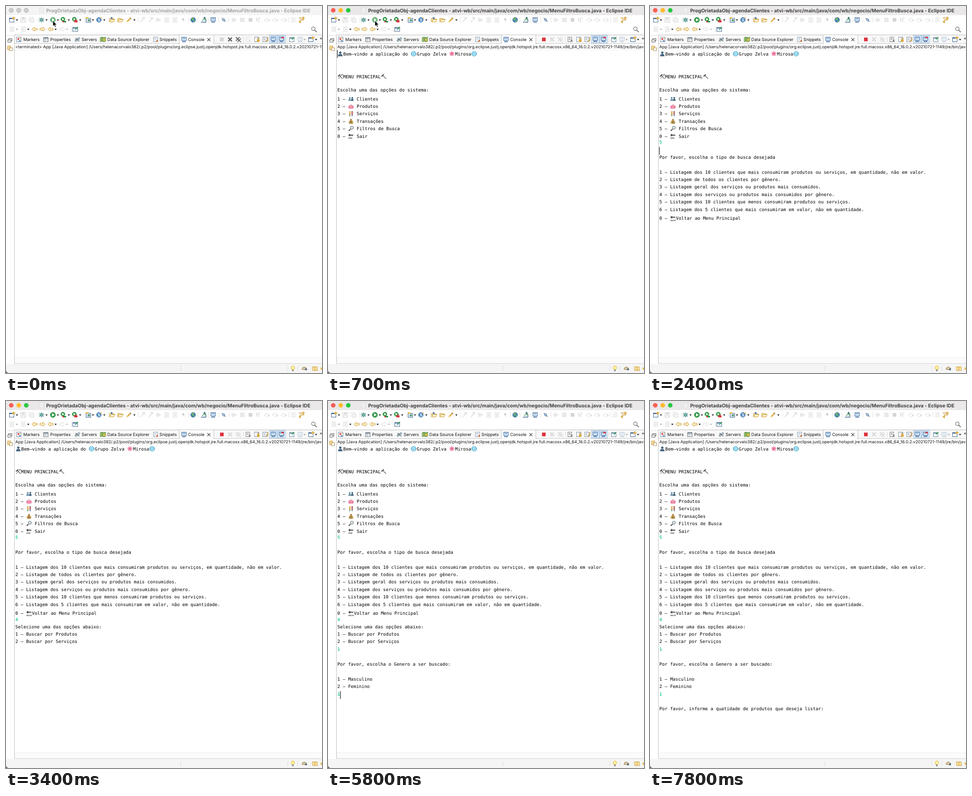
Animation, 694 px wide and 807 px high, one loop 8000 ms. Source, as an HTML page:

```html
<!DOCTYPE html>
<html lang="pt">
<head>
<meta charset="utf-8">
<title>Console</title>
<style>
  html, body { margin: 0; width: 100%; height: 100%; overflow: hidden; background: #fff; }
  svg { display: block; width: 100vw; height: 100vh; }
  text { white-space: pre; text-rendering: geometricPrecision; }
  .ui { font: 9.25px Inter, sans-serif; fill: #111; }
  .label { font: 9.15px Inter, sans-serif; fill: #111; }
  .title { font: bold 10.73px Inter, sans-serif; text-anchor: middle; }
  .mono { font: 9.84px "DejaVu Sans Mono", monospace; }
  .typed { font-weight: bold; fill: #2fcf96; }
  .tiny { font: bold 4.2px Inter, sans-serif; fill: #444; }
</style>
</head>
<body>
<svg id="stage" viewBox="0 0 694 807"></svg>
<script>
const LOOP = 8000;
const GOLD = '#c9952f', NAVY = '#3d638c', GREEN = '#35a04b', RED = '#e0303c', PALE = '#dadada', DARK = '#555';

const rect = (x, y, w, h, fill, stroke = 'none') =>
  `<rect x="${x}" y="${y}" width="${w}" height="${h}" fill="${fill}" stroke="${stroke}"/>`;
const dot = (x, y, r, fill, stroke = 'none') =>
  `<circle cx="${x}" cy="${y}" r="${r}" fill="${fill}" stroke="${stroke}"/>`;
const line = (d, stroke, w = 1) =>
  `<path d="${d}" fill="none" stroke="${stroke}" stroke-width="${w}"/>`;
const fill = (d, color, stroke = 'none') => `<path d="${d}" fill="${color}" stroke="${stroke}"/>`;
const text = (x, y, cls, s, extra = '') => `<text x="${x}" y="${y}" class="${cls}" ${extra}>${s}</text>`;
const at = (x, y, body, extra = '') => `<g transform="translate(${x} ${y})" ${extra}>${body}</g>`;
const scaled = (sx, sy, body) => `<g transform="scale(${sx} ${sy})">${body}</g>`;
const during = (from, to, body) => `<g class="timed" data-from="${from}" data-to="${to}">${body}</g>`;

const drop = (x, y, color = '#222') => fill(`M${x - 2.5} ${y - 1}h5l-2.5 3.2z`, color);
const dots = (x, y) => `<path d="M${x} ${y - 5}v11" stroke="#a5a5a5" stroke-dasharray="1 2"/>`;

// Icons are drawn around their own centre.
const icon = {
  window: (c = NAVY) => rect(-5.5, -4, 10, 9, '#fff', c) + rect(-5.5, -4, 10, 2, c),
  wizard: () => icon.window() + fill('M4 -7l1.3 2.3 2.4 .7-2.4 1.2L4 -.5 2.8-2.8.5-4l2.3-.7z', '#f3c74a', GOLD),
  save: () => rect(-5.5, -5.5, 11, 11, '#f7f7f7', PALE) + rect(-3, -5, 6, 4, PALE) + rect(-3, 1.5, 6, 4, '#fff', PALE),
  saveAll: () => rect(-5.5, -5.5, 8, 8, '#fff', PALE) + rect(-2.5, -2.5, 8, 8, '#f4f4f4', PALE),
  bug: () => line('M-5-4l10 8M5-4l-10 8M-6 0H6M0-6V6', '#4c8c8a', 1.1) + dot(0, 0, 3, '#7fc0a8', '#2d7278'),
  run: () => dot(0, 0, 5.6, GREEN, '#258239') + fill('M-2-3.5L4 0-2 3.5z', '#fff'),
  smallRun: () => at(-1, -1.5, scaled(.8, .8, icon.run())),
  cover: () => icon.smallRun() + rect(-2, 2.5, 3, 3, RED) + rect(1, 2.5, 5, 3, '#1e8d39'),
  tools: () => icon.smallRun() + rect(-1, 1, 7, 4.5, '#d8343c') + line('M1 .5v-1h3v1', '#a3202a'),
  server: () => rect(-5, -3.5, 10, 9, '#dceaf5', NAVY) + dot(1, 1, 2.5, '#59a06b') + rect(-6, -6, 6, 3, '#f0c34c'),
  service: () => dot(0, 0, 5, '#4382bd', '#285e95') + text(-2.8, 3.2, 'ui', 'S', 'style="fill:#fff;font-weight:bold"') + fill('M4-6l3 2-3 2z', '#e5ad35'),
  folder: () => fill('M-5.5 4.5v-8h4l1 1.5h5v2', '#fbe9b5', GOLD) + fill('M-5.5 4.5l3-5.5H6.5L3.5 4.5z', '#fdf1cb', GOLD),
  folderBlue: () => icon.folder() + dot(-1, -4, 2.2, '#5082b5'),
  pencil: () => line('M-4 4L4-4', '#dfac44', 3) + line('M2-5l3 3', '#9f6a38', 1.3) + fill('M-6 6l1-4 3 3z', '#f7e2a2'),
  paper: () => rect(-4, -5, 8, 10, '#fafafa', PALE) + line('M-2-2h4M-2 0h4M-2 2h4', PALE),
  brush: () => line('M-4 5L3-4M-2-5h6v4', PALE, 1.5),
  para: () => text(-2.5, 3.5, 'ui', '¶', 'style="fill:#bbb"'),
  globe: () => dot(0, 0, 5.2, '#4186bb', '#2a608d') + fill('M-4-2l3-3 3 1-1 3-3 3zM1 1l3-1-1 4-2 1z', '#78b767'),
  runner: () => line('M-6 5h11V-2', NAVY, 1.3) + line('M-3 2l4-4 4-2M0-4l5 5', '#45945b', 1.5) + dot(2, -5, 1.6, '#355f92'),
  screen: () => rect(-5, -5, 10, 7.5, '#d8eafa', '#335e92') + rect(-3, -3, 6, 1, '#335e92') + line('M-4 5H4', '#335e92', 1.6),
  skip: () => line('M-4-4L4 4', NAVY, 1.2) + dot(0, 0, 2.5, '#bed1e6', NAVY),
  play: () => rect(-5, -4, 1.5, 8, PALE) + fill('M-2-4L5 0-2 4z', '#eee', PALE),
  pause: () => rect(-4, -4, 3, 8, '#eee', PALE) + rect(1, -4, 3, 8, '#eee', PALE),
  stop: (c = '#d4d4d4') => rect(-4, -4, 8, 8, c),
  zig: () => line('M-5 4v-8l5 8v-8h4', PALE, 1.3),
  step: () => line('M-5 3q0-6 5-6t4 5M2 0l2 3 3-3M-2 4h4', PALE, 1.2),
  lines: () => line('M-5-4H5M-5 0H5M-5 4H2', PALE, 1.4) + line('M4 2v4', PALE),
  flow: () => line('M-6-4H4M-3 0H6M-6 4h5', GOLD, 1.6) + fill('M3-7l4 3-4 3zM-2 1l-4 3 4 3z', '#f1c65d', GOLD),
  arrow: (c = GOLD, f = '#fff4cf') => fill('M-6 0l5-4.5V-2h6.5v4H-1v2.5z', f, c),
  arrowRight: (c, f) => scaled(-1, 1, icon.arrow(c, f)),
  editor: () => rect(-5.5, -4, 11, 9, '#eaf3fa', '#52708d') + rect(-5.5, -4, 11, 2.5, '#6484a5') + line('M0 1l6-6', '#3f9b5c', 2),
  search: () => dot(-1, -1, 4, 'none', '#555') + line('M2 2l4.5 4.5', '#555', 1.6),
  cross: (c, w = 2.8) => line('M-4-4L4 4M4-4L-4 4', c, w),
  crosses: c => at(-1, -1, icon.cross(c, 2)) + at(2, 2, icon.cross(c, 1.7)),
  clear: (c = '#777') => rect(-5, -5, 8, 10, '#fff', c) + line('M-3-2h4M-3 0h3', c) + at(3, 3, line('M-2-2l4 4M2-2l-4 4', c, 1.4)),
  lock: () => rect(-5, -5, 9, 10, '#fff', '#78889a') + rect(0, 0, 6, 5, '#e2aa38') + line('M1.5 0v-3h3v3', '#9d7425'),
  wrap: () => rect(-5, -5, 9, 10, '#fff', '#78889a') + line('M-3-2h4M-3 1h4', '#78889a') + line('M6-5v8H1', GOLD, 1.5),
  toggle: c => rect(-8.5, -8.5, 17, 17, '#d9e9f7', '#a9c6df') + icon.screen() + rect(0, -5, 5, 3, c),
  pin: () => icon.window('#6585a3') + line('M0 0l5-5', '#3c9a58', 2.3),
  markers: () => rect(-5, -5, 10, 10, '#fff', '#7590aa') + dot(-1, -1, 2, RED) + line('M0 3h4', '#4a74a3', 2) + dot(3, -2, 1.3, '#e8b53a'),
  table: () => icon.window('#66727c') + line('M-2-2v7M-5 1H4', '#9ba5ad'),
  servers: () => line('M-5 4L4-4M-4-3l8 7', '#72818a', 1.8) + dot(-3, 2, 2.3, '#b8c9d2', '#5e717d') + dot(3, -2, 2, '#d7e5ec', '#5e717d'),
  database: () => fill('M-6-4l4-1 4 1 4-1v9l-4 1-4-1-4 1z', '#a6cb6b', '#508741') + line('M-2-5v9M2-4v9', '#4f7c4a', 1.5) + dot(3, 1, 2.5, '#eabb45'),
  snippet: () => rect(-5, -5, 9, 10, '#fff', '#8594a5') + line('M-3-2h5M-3 1h3', '#7aa0c6') + dot(3, 3, 2, '#d5723e'),
  restore: () => rect(-3, -4, 7, 5, '#fff', DARK) + rect(-5, -1, 7, 5, '#fff', DARK),
  files: () => rect(-5, -5, 7, 8, '#f6dda0', GOLD) + rect(-1, -1, 7, 6, '#fff', '#a68745'),
  bulb: () => dot(0, -1.5, 4, '#fff0a0', '#e0b83a') + rect(-1.8, 2.5, 3.6, 3.5, '#8c8c8c'),
  hat: () => fill('M-6 2q1-6 6-5l4 2v4z', '#d9caa2', '#8d7648') + rect(1, 0, 4, 4, '#586f87'),
  map: () => fill('M-5-4l4 1 3-1 4 1v8l-4-1-3 1-4-1z', '#ffeeb8', GOLD) + line('M-1-3v8M2-4v8', GOLD)
};
const put = (name, x, y, ...args) => at(x, y, icon[name](...args));

// Console pictograms, 12 px wide.
const bust = (x, c) => at(x, 0, dot(0, -2.5, 2.6, c) + fill('M-5 5.5q0-5 5-5t5 5z', c));
const halfBust = (x, c) => at(x, 0, dot(0, -2, 1.9, c) + fill('M-3 4.5q0-4.5 3-4.5t3 4.5z', c));
const globe = () => dot(0, 0, 5.3, '#5bbfe2', '#3a97bd') + line('M-5 0H5M0-5V5M-4-3q4 2 8 0M-4 3q4-2 8 0', '#d5f3fb', .8) + '<ellipse rx="2.6" ry="5.2" fill="none" stroke="#d5f3fb" stroke-width=".8"/>';
const hammer = () => line('M-2-2L5 5', '#6b5a4c', 1.3) + line('M-5 0L0-4.5', '#444', 2.2);
const back = label => line('M-4-2H5', '#444', 2) + fill('M-6-2l4-3.5v7z', '#444') + text(-5.5, 6, 'tiny', label);
const picto = {
  person: () => bust(0, '#42647f'),
  people: () => halfBust(-2.8, '#6d92ac') + halfBust(2.8, '#40637e'),
  globe,
  flower: () => Array.from({length: 5}, (_, i) => {
    const a = i * Math.PI * .4 - Math.PI / 2;
    return dot(3.2 * Math.cos(a), 3.2 * Math.sin(a), 2.4, '#f29abb');
  }).join('') + dot(0, 0, 1.8, '#d64e83'),
  tools: () => line('M-4.5 5L4-4', '#8d989e', 1.4) + dot(4, -4, 1.4, 'none', '#78858c') + hammer(),
  hammer,
  purse: () => line('M-3-1q3-5 6 0', '#c2648b') + fill('M-5.5 0q5.5-2.5 11 0l-1 4.5h-9z', '#f28bb4', '#d9608f') + rect(-1, 0, 2, 2, '#f8d865'),
  pair: () => dot(-2.5, -4, 1.5, '#d8903c') + dot(2.5, -4, 1.5, '#704b31') + rect(-4, -2.3, 3, 4, '#e0a330') + rect(1, -2.3, 3, 4, '#d64d44') + rect(-3.4, 1.5, 1.8, 4, '#477f55') + rect(1.6, 1.5, 1.8, 4, '#49658c'),
  money: () => fill('M-2-5h4l-1 2q4 3 4 6t-3 3h-4q-3 0-3-3t4-6z', '#c29a50') + line('M-2-3h4', '#755522') + text(-1.4, 4, 'tiny', '$'),
  lens: () => line('M-5 5l4-4', '#333', 1.8) + dot(2, -2, 3.3, '#d8edf7', '#555'),
  end: () => back('END'),
  back: () => back('BACK')
};
// The console face has a wide hyphen.
const mono = (cy, s, x = 20.5, cls = '') => text(x, cy + 3.6, 'mono ' + cls, s.replace('-', '–'));
const typed = (cy, s) => mono(cy, s, 20.5, 'typed');
const pic = (name, x, cy) => at(x, cy, picto[name]());
const option = (cy, n, name, label) => mono(cy, n + ' -') + pic(name, 50.5, cy) + mono(cy, label, 63);
const list = (cy, items) => items.map((s, i) => mono(cy + i * 16.4, `${i + 1} - ${s}`)).join('');

function titleBar(active) {
  const lights = active ? ['#fb5f57', '#fdbc2e', '#28c840'] : ['#cecccd', '#cecccd', '#cecccd'];
  return rect(0, 0, 694, 20, active ? '#eae8e9' : '#f5f4f5') +
    lights.map((c, i) => dot(11.5 + i * 16.5, 9.5, 5, c, active ? 'none' : '#bdbbbc')).join('') +
    at(78, 9.5, icon.paper()) +
    text(378.3, 13.5, 'title', 'ProgOrietadaObj-agendaClientes - atvi-wb/src/main/java/com/wb/negocio/MenuFiltroBusca.java - Eclipse IDE', `fill="${active ? '#414141' : '#a6a4a5'}"`);
}

function toolbars() {
  const top = {
    wizard: [13], save: [38], saveAll: [56], bug: [78], cover: [126], tools: [151], server: [181],
    service: [204], folderBlue: [233], folder: [251], pencil: [270], brush: [300, 318], paper: [353, 371],
    para: [389], globe: [411], runner: [434], screen: [455], skip: [478], play: [335, 501], pause: [519],
    stop: [537], zig: [555], step: [573, 591, 610], lines: [631], flow: [649]
  };
  return Object.entries(top).map(([name, xs]) => xs.map(x => put(name, x, 30.5)).join('')).join('') +
    [24, 89, 114, 138, 163, 191, 216, 282].map(x => drop(x, 30.5)).join('') +
    [70, 173, 224.5, 291, 400.5, 421.5, 445.5, 467.5, 489.5, 621].map(x => dots(x, 30.5)).join('') +
    during(0, 1000, at(103, 30.5, icon.run(), 'opacity=".75"')) + during(1000, LOOP, put('run', 103, 30.5)) +
    put('paper', 13, 51) + drop(24, 51, '#aaa') + put('paper', 38, 51) + drop(49, 51) +
    put('arrow', 63, 51) + put('arrowRight', 80, 51) + put('arrow', 98, 51) + drop(109, 51) +
    put('arrowRight', 123, 51, PALE, '#fff') + drop(134, 51, '#bbb') +
    dots(143.5, 51) + put('editor', 152, 51) + put('search', 676, 51);
}

function frame() {
  const tabs = [['markers', 28, 38, 'Markers'], ['table', 88, 97, 'Properties'], ['servers', 157, 166, 'Servers'],
    ['database', 213, 222.5, 'Data Source Explorer'], ['snippet', 329, 337, 'Snippets'], ['screen', 391, 400, 'Console']];
  return rect(18.5, 63.5, 680, 722.5, '#fff', '#bcbcbc') + rect(19, 64, 675, 18, '#f8f8f8') +
    rect(380.5, 63.5, 76, 20, '#fff', '#bcbcbc') + line('M19 82.5H380M457 82.5H694', '#c6c6c6') + rect(381, 82, 75, 3, '#fff') +
    tabs.map(([name, x, tx, s]) => put(name, x, 73.5) + text(tx, 77, 'ui', s)).join('') +
    at(445.5, 74, line('M-3.3-3.3L3.3 3.3M3.3-3.3L-3.3 3.3', '#333', 1.2)) + line('M19 96.5H694', '#ececec') +
    '<path d="M3 65h13" stroke="#888" stroke-dasharray="1 2"/>' + put('restore', 9, 75.5) + put('files', 8.5, 93) +
    rect(0, 787, 694, 20, '#f5f5f5') + dots(384, 797) + dots(619, 797) + dots(641, 797) +
    put('bulb', 630, 797) + put('hat', 656, 797) + put('map', 678, 797) + rect(691, 795, 3, 5, '#e9bd54') +
    fill('M0 801q1 5 6 6H0z', '#5f7861');
}

function consoleTools(running) {
  return put('stop', 474, 73.5, running ? RED : '#d4d4d4') +
    put('cross', 492, 73.5, running ? PALE : '#666') + put('crosses', 510, 73.5, running ? PALE : '#666') +
    put('clear', 532, 73.5, running ? '#777' : PALE) + dots(521.5, 73.5) +
    put('lock', 551, 73.5) + put('wrap', 569, 73.5) + put('toggle', 587, 73, '#8fb8df') + put('toggle', 605, 73, RED) +
    dots(616.5, 73.5) + put('pin', 628, 73.5);
}
const commonTools = at(646, 73.5, icon.screen(), 'opacity=".3"') + drop(656, 73.5, '#aaa') + put('wizard', 670, 73.5) + drop(681, 73.5) + rect(690.5, 70.5, 6, 2, '#fff', '#444');
const scroller = rect(19, 773.5, 675, 12, '#fbfbfb') + line('M19 773.5H694', '#ececec');
const label = s => text(20.5, 93, 'label', s);
const command = 'App [Java Application] /Users/helenacorvalo382/.p2/pool/plugins/org.eclipse.justj.openjdk.hotspot.jre.full.macosx.x86_64_16.0.2.v20210721-1149/jre/bin/java';

const menu = pic('person', 27, 105) + mono(105, 'Bem-vindo a aplicação do', 33.5) + pic('globe', 188, 105) +
  mono(105, 'Grupo Zelva', 195) + pic('flower', 272, 105) + mono(105, 'Mirosa', 279) + pic('globe', 321, 105) +
  pic('tools', 27, 155) + mono(155, 'MENU PRINCIPAL', 33) + pic('hammer', 122.5, 155) +
  mono(184.5, 'Escolha uma das opções do sistema:') +
  [['1', 'people', 'Clientes'], ['2', 'purse', 'Produtos'], ['3', 'pair', 'Serviços'], ['4', 'money', 'Transações'],
   ['5', 'lens', 'Filtros de Busca'], ['0', 'end', 'Sair']].map((o, i) => option(204 + i * 16.4, ...o)).join('');

const search = mono(332, 'Por favor, escolha o tipo de busca desejada') + list(365, [
  'Listagem dos 10 clientes que mais consumiram produtos ou serviços, em quantidade, não em valor.',
  'Listagem de todos os clientes por gênero.',
  'Listagem geral dos serviços ou produtos mais consumidos.',
  'Listagem dos serviços ou produtos mais consumidos por gênero.',
  'Listagem dos 10 clientes que menos consumiram produtos ou serviços.',
  'Listagem dos 5 clientes que mais consumiram em valor, não em quantidade.'
]) + mono(466.5, '0 -') + pic('back', 50.5, 466.5) + mono(466.5, 'Voltar ao Menu Principal', 57);

const output = [
  [700, menu],
  [2200, typed(299.5, '5')],
  [2400, search],
  [2800, typed(480, '4')],
  [3000, mono(496, 'Selecione uma das opções abaixo:') + list(512.3, ['Buscar por Produtos', 'Buscar por Serviços'])],
  [4200, typed(545.5, '1')],
  [4500, mono(578, 'Por favor, escolha o Genero a ser buscado:') + list(611, ['Masculino', 'Feminino'])],
  [5800, typed(644, '1')],
  [6000, mono(676.5, 'Por favor, informe a quatidade de produtos que deseja listar:')]
];
// from, to, x, y
const carets = [
  [700, 1200, 20, 97], [1900, 2200, 20, 97], [2200, 2400, 26.5, 293], [2400, 2700, 20, 310],
  [2800, 3000, 26.5, 474], [3000, 3400, 20, 491], [4000, 4200, 20, 491], [4200, 4500, 26.5, 539],
  [4500, 5000, 20, 556], [5800, 6000, 26.5, 638], [6000, 6400, 20, 654], [7100, 7300, 20, 654]
];

const stage = document.getElementById('stage');
stage.innerHTML = rect(0, 0, 694, 807, '#fff') +
  during(0, 100, titleBar(false)) + during(100, LOOP, titleBar(true)) +
  toolbars() + frame() + commonTools +
  during(0, 200, consoleTools(false) + label('&lt;terminated> ' + command) + scroller) +
  during(200, 600, at(628, 73.5, icon.pin(), 'opacity=".3"') + label('No consoles to display at this time.')) +
  during(200, 300, text(388, 800.5, 'ui', 'Launching App')) +
  during(300, 600, text(388, 800.5, 'ui', 'Launching App: (45%)')) +
  during(600, LOOP, consoleTools(true) + label(command) + scroller) +
  output.map(([from, body]) => during(from, LOOP, body)).join('') +
  carets.map(([from, to, x, y]) => during(from, to, rect(x, y, 1.3, 17, '#222'))).join('') +
  during(0, 2000, '<g id="mouse"><path d="M0 0V12L2.8 9.4 4.8 14 6.8 13.1 4.8 8.7H8.6Z" fill="#000" stroke="#fff" stroke-width=".8"/></g>');

const timed = [...stage.querySelectorAll('.timed')].map(el => ({ el, from: +el.dataset.from, to: +el.dataset.to }));
const mouse = document.getElementById('mouse');
const start = performance.now();

function draw() {
  const t = (performance.now() - start) % LOOP;
  for (const { el, from, to } of timed) el.style.display = t >= from && t < to ? '' : 'none';
  const p = Math.min(1, Math.max(0, (t - 900) / 500));
  const ease = p * p * (3 - 2 * p);
  mouse.setAttribute('transform', `translate(${103 + 107 * ease} ${32.5 + 224 * ease})`);
  requestAnimationFrame(draw);
}
draw();
</script>
</body>
</html>
```
